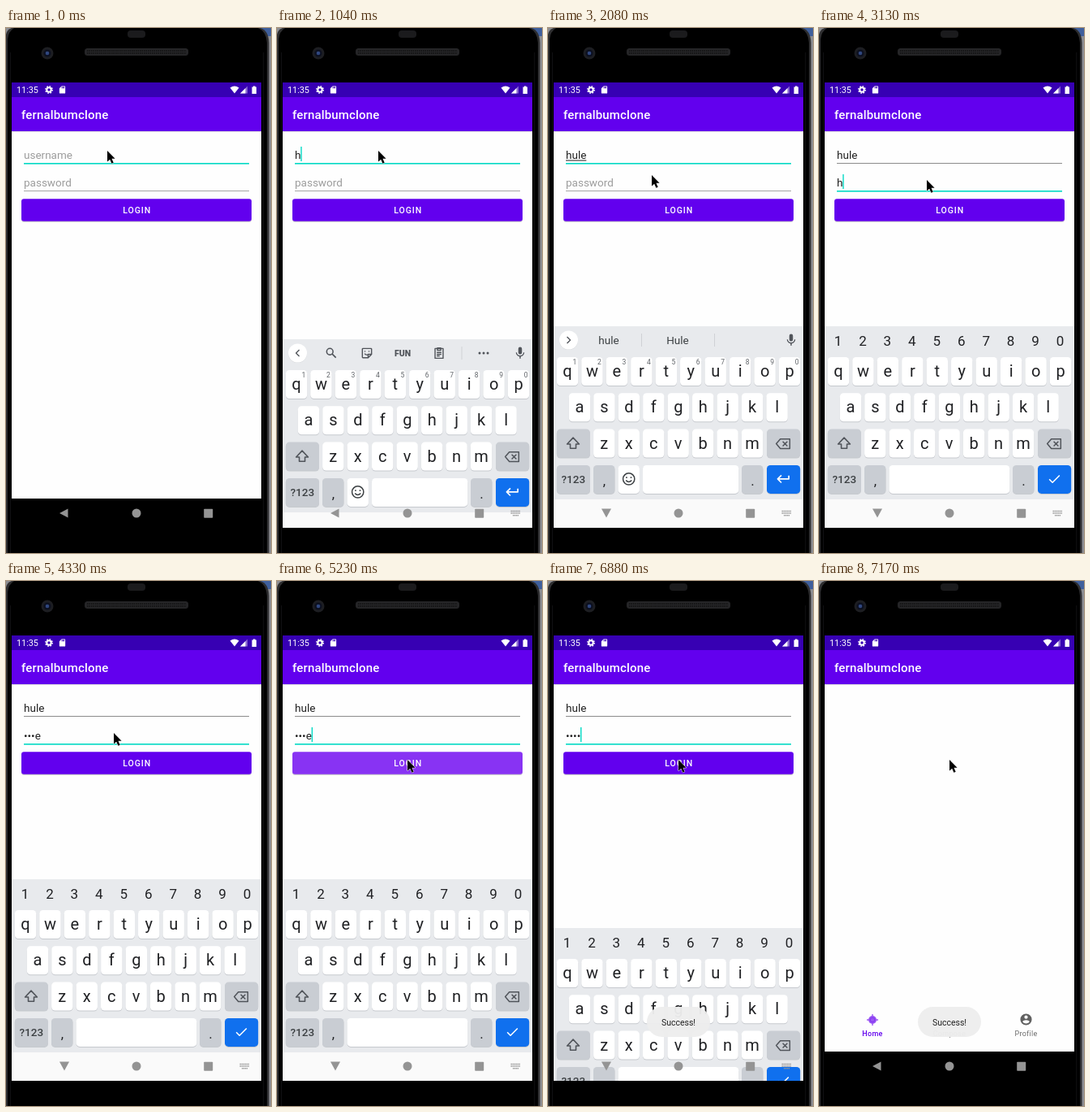
Animation of 327 by 646 pixels, one loop 8 s. Source, as an HTML page:

```html
<!DOCTYPE html>
<html lang="en">
<head>
<meta charset="utf-8">
<title>Login demo</title>
<style>
html, body { margin: 0; width: 100%; height: 100%; overflow: hidden; background: #000; }
svg { display: block; width: 327px; height: 646px; font-family: Roboto, sans-serif; }
text { white-space: pre; }
</style>
</head>
<body>
<script>
(() => {
const LOOP = 8000, USER = 'hule', TITLE = 'fernalbumclone';
const PURPLE = '#6200ee', TEAL = '#03dac5', INK = '#212121', HINT = '#9c9c9c', KEY_INK = '#202124';

function el(parent, tag, attrs = {}, content) {
  const node = document.createElementNS('http://www.w3.org/2000/svg', tag);
  for (const k in attrs) node.setAttribute(k, attrs[k]);
  if (content !== undefined) node.textContent = content;
  parent.appendChild(node);
  return node;
}
const group = (p, a) => el(p, 'g', a);
const box = (p, x, y, width, height, fill, rx = 0) => el(p, 'rect', { x, y, width, height, fill, rx });
const dot = (p, cx, cy, r, fill) => el(p, 'circle', { cx, cy, r, fill });
const path = (p, d, fill) => el(p, 'path', { d, fill });
const label = (p, s, x, y, size, fill, extra = {}) =>
  el(p, 'text', { x, y, 'font-size': size, fill, ...extra }, s);
const mid = (p, s, x, y, size, fill, extra = {}) =>
  label(p, s, x, y, size, fill, { 'text-anchor': 'middle', ...extra });
const at = (node, x, y) => node.setAttribute('transform', `translate(${x} ${y})`);
const show = (node, on) => node.setAttribute('visibility', on ? 'inherit' : 'hidden');

// Icons live on a 24-unit grid centred on (x, y)
function icon(p, d, x, y, size, color, line = 0) {
  const k = size / 24;
  const paint = line
    ? { fill: 'none', stroke: color, 'stroke-width': line, 'stroke-linejoin': 'round' }
    : { fill: color, 'fill-rule': 'evenodd' };
  return el(p, 'path', { d, transform: `translate(${x - size / 2} ${y - size / 2}) scale(${k})`, ...paint });
}

const ICON = {
  sd: 'M18 2h-8L4 8v12c0 1.1.9 2 2 2h12c1.1 0 2-.9 2-2V4c0-1.1-.9-2-2-2zm-6 6h-2V4h2zm3 0h-2V4h2zm3 0h-2V4h2z',
  person: 'M12 2a10 10 0 1 0 0 20a10 10 0 1 0 0-20zm0 3a3 3 0 1 1 0 6a3 3 0 1 1 0-6zm0 14.2c-2.5 0-4.7-1.3-6-3.2 0-2 4-3.1 6-3.1s6 1.1 6 3.1c-1.3 1.9-3.5 3.2-6 3.2z',
  mic: 'M12 14a3 3 0 0 0 3-3V5a3 3 0 0 0-6 0v6a3 3 0 0 0 3 3zm5.3-3c0 3-2.5 5.1-5.3 5.1S6.7 14 6.7 11H5c0 3.4 2.7 6.2 6 6.7V21h2v-3.3c3.3-.5 6-3.3 6-6.7z',
  search: 'M9.5 4a5.5 5.5 0 1 0 0 11a5.5 5.5 0 1 0 0-11M14 14l6 6',
  sticker: 'M5 4h14a1 1 0 0 1 1 1v9l-6 6H5a1 1 0 0 1-1-1V5a1 1 0 0 1 1-1M14 20v-6h6M8.5 8v2M15.5 8v2M8 13q2 3 5 1.5',
  clip: 'M5 4h14v17H5zM9 3h6v4H9zM8 11h8M8 14h8M8 17h5',
  left: 'M15 6l-6 6 6 6',
  right: 'M9 6l6 6-6 6',
  shift: 'M12 4L3.5 13H8v6h8v-6h4.5z',
  erase: 'M8 5h14v14H8l-6-7zM11.5 8.5l7 7M18.5 8.5l-7 7',
  smile: 'M12 3a9 9 0 1 0 0 18a9 9 0 1 0 0-18M8.5 8.5v2.5M15.5 8.5v2.5M7.5 14q4.5 5 9 0',
  enter: 'M20 7v5H4M9 6.5l-5.5 5.5 5.5 5.5',
  check: 'M4 12.5l5 5L20 6.5'
};

const svg = el(document.body, 'svg', { viewBox: '0 0 327 646', width: 327, height: 646 });
const defs = el(svg, 'defs');
el(el(defs, 'clipPath', { id: 'screen' }), 'rect', { x: 7, y: 67, width: 308, height: 548 });
const reveal = el(el(defs, 'clipPath', { id: 'reveal' }), 'rect', { x: 7, y: 85, width: 308, height: 530 });

function drawPhone() {
  box(svg, 0, 0, 327, 646, '#8c8d92');
  box(svg, 300, 0, 27, 10, '#3f5f9c');
  path(svg, 'M0 8Q1 2 7 0H314Q324 3 324.5 18V646H0z', '#2e2e30');
  path(svg, 'M2 14Q3 4 10 0H311Q321 4 322 18V646H2z', '#000');
  box(svg, 5, 30, .7, 616, '#18181a');
  box(svg, 317.5, 30, .7, 616, '#18181a');
  box(svg, 150, 3, 22, 9, '#1b1b1d', 4);
  box(svg, 97, 25, 128, 9, '#252527', 3.5);
  el(svg, 'path', { d: 'M100 28H222M100 31H222', stroke: '#101011', 'stroke-width': 1.5, 'stroke-dasharray': '1.5 1' });
  dot(svg, 51, 31, 7.5, '#1d1e22');
  dot(svg, 51, 31, 4.5, '#0c1020');
  dot(svg, 51, 31, 2.3, '#30477f');
}

function drawStatus() {
  box(svg, 7, 67, 308, 18, '#3700b3');
  label(svg, '11:35', 13, 80, 10.8, '#fff');
  el(svg, 'circle', { cx: 53, cy: 76, r: 2.7, fill: 'none', stroke: '#fff', 'stroke-width': 2 });
  el(svg, 'circle', { cx: 53, cy: 76, r: 4.2, fill: 'none', stroke: '#fff', 'stroke-width': 1.5, 'stroke-dasharray': '1.65 1.65' });
  icon(svg, ICON.sd, 69.5, 76, 11, '#fff');
  path(svg, 'M276.5 73.5Q282 69.5 287.5 73.5L282 80.5z', '#fff');
  path(svg, 'M289 80.5L298 71.5V80.5z', 'rgba(255,255,255,.4)');
  path(svg, 'M289 80.5L295.5 74V80.5z', '#fff');
  path(svg, 'M303.5 72.5H305V71.5H307.5V72.5H309V81H303.5z', '#fff');
}

function appBar(p) {
  box(p, 7, 85, 308, 530, '#fefefe');
  box(p, 7, 127, 308, 1, '#dedede');
  box(p, 7, 85, 308, 42, PURPLE);
  label(p, TITLE, 19, 112, 15, '#fff', { 'font-weight': 500, 'letter-spacing': .15 });
}

function field(p, y, hint) {
  const base = y + 15;
  const f = {
    width: 0,
    hint: label(p, hint, 22, base, 13.5, HINT),
    text: label(p, '', 22, base, 13.5, INK),
    line: box(p, 22, y + 20, 278, 1, '#8c8c8c'),
    caret: box(p, 22, y, 1.4, 18, TEAL)
  };
  f.set = (value, focused, caret, resting) => {
    if (f.text.textContent !== value) f.text.textContent = value;
    f.width = value ? f.text.getComputedTextLength() : 0;
    show(f.hint, !value);
    f.line.setAttribute('fill', focused ? TEAL : resting);
    f.line.setAttribute('height', focused ? 1.6 : 1);
    f.caret.setAttribute('x', 21.8 + f.width);
    show(f.caret, caret);
  };
  return f;
}

function key(p, x, y, w, fill = '#fff') {
  box(p, x, y + 1, w, 35, '#c6c9ce', 4.5);
  return box(p, x, y, w, 35, fill, 4.5);
}

function drawKeyboard(p) {
  const GREY = '#c9cdd3', ICON_INK = '#50545a', pitch = 30.45;
  const kb = { root: group(p) }, r = kb.root;
  const rowY = i => 405 + i * 44.3;
  box(r, 7, 367, 308, 213, '#e8eaed');
  box(r, 7, 580, 308, 36, '#fafafa');
  kb.sup = group(r);
  [['qwertyuiop', 24], ['asdfghjkl', 39], ['zxcvbnm', 69.3]].forEach(([chars, x0], i) => {
    [...chars].forEach((c, j) => {
      const x = x0 + j * pitch, y = rowY(i);
      key(r, x - 13.2, y, 26.4);
      mid(r, c, x, y + 24, 20, KEY_INK);
    });
  });
  r.appendChild(kb.sup);
  kb.nums = group(r);
  for (let i = 0; i < 10; i++) {
    const x = 24 + i * pitch, d = (i + 1) % 10;
    mid(kb.sup, d, x + 9, rowY(0) + 9, 8.5, '#5f6368');
    mid(kb.nums, d, x - .5, 391, 17, KEY_INK);
  }

  key(r, 10.8, rowY(2), 41.2, GREY);
  icon(r, ICON.shift, 31, rowY(2) + 17.5, 21, ICON_INK, 1.8);
  key(r, 270, rowY(2), 41.2, GREY);
  icon(r, ICON.erase, 290, rowY(2) + 18, 20, ICON_INK, 1.8);

  const y = rowY(3);
  key(r, 10.8, y, 41.2, GREY);
  mid(r, '?123', 31.3, y + 22, 13.5, '#3c4043', { 'font-weight': 500 });
  key(r, 56, y, 26.4, GREY);
  mid(r, ',', 69.5, y + 25, 17, KEY_INK);
  key(r, 239, y, 26.4, GREY);
  mid(r, '.', 252.5, y + 25, 17, KEY_INK);
  key(r, 270, y, 41.2, '#1070ee');
  kb.plain = group(r);
  key(kb.plain, 86.5, y, 26.4);
  icon(kb.plain, ICON.smile, 99.7, y + 17, 19, '#3c4043', 1.9);
  key(kb.plain, 117, y, 118.3);
  icon(kb.plain, ICON.enter, 290.5, y + 17, 20, '#fff', 2);
  kb.secret = group(r);
  key(kb.secret, 86.5, y, 148.8);
  icon(kb.secret, ICON.check, 290.5, y + 17, 19, '#fff', 2);

  kb.strip = group(r);
  dot(kb.strip, 25.5, 384.6, 11.5, '#d5d7da');
  dot(kb.strip, 25.5, 384, 11.5, '#fff');
  icon(kb.strip, ICON.mic, 300, 384, 18, ICON_INK);
  kb.tools = group(r);
  icon(kb.tools, ICON.left, 25.5, 384, 16, ICON_INK, 2);
  icon(kb.tools, ICON.search, 67, 384, 17, ICON_INK, 2.2);
  icon(kb.tools, ICON.sticker, 111, 384, 17, ICON_INK, 2);
  mid(kb.tools, 'FUN', 155, 388, 10.5, ICON_INK, { 'font-weight': 900 });
  icon(kb.tools, ICON.clip, 200, 384, 17, ICON_INK, 2);
  box(kb.tools, 227.5, 376, 1, 16, '#cfd1d5');
  for (const x of [250, 255, 260]) dot(kb.tools, x, 384, 1.5, ICON_INK);
  kb.words = group(r);
  icon(kb.words, ICON.right, 25.5, 384, 16, ICON_INK, 2);
  for (const x of [115, 205]) box(kb.words, x, 376, 1, 16, '#cfd1d5');
  kb.low = mid(kb.words, '', 75, 389, 13.5, '#3c4043');
  kb.cap = mid(kb.words, '', 160, 389, 13.5, '#3c4043');
  return kb;
}

function drawHome(p) {
  appBar(p);
  const c = '#9a56f4';
  dot(p, 66, 540, 5, c);
  el(p, 'path', { d: 'M66 533V547M59 540H73', stroke: c, 'stroke-width': 1.4 });
  el(p, 'circle', { cx: 66, cy: 540, r: 2.8, fill: 'none', stroke: '#7b2bf0', 'stroke-width': .8 });
  icon(p, ICON.person, 255.5, 539.5, 17, '#616161');
  const tab = (s, x, fill) => mid(p, s, x, 559.5, 9, fill, { 'letter-spacing': .3 });
  tab('Home', 66, PURPLE).setAttribute('font-weight', 500);
  tab('Compose', 161, '#757575');
  tab('Profile', 255.5, '#6c6c6c');
}

drawPhone();
const view = group(svg, { 'clip-path': 'url(#screen)' });
const login = group(view);
appBar(login);
const user = field(login, 146, 'username');
const pass = field(login, 180, 'password');
const compose = box(login, 22, 162.5, 0, 1, INK);
box(login, 19, 211, 284, 28, '#d2d2d2', 3.5);
const button = box(login, 19, 210.3, 284, 27.5, PURPLE, 3);
mid(login, 'LOGIN', 161.7, 228.2, 10.5, '#fff', { 'font-weight': 500, 'letter-spacing': .94 });
const home = group(group(view, { 'clip-path': 'url(#reveal)' }));
drawHome(home);
drawStatus();

const overlay = group(svg, { 'clip-path': 'url(#screen)' });
box(overlay, 7, 579, 308, 36, '#000');
const kb = drawKeyboard(overlay);
const NAV = '#949494';
const back = path(overlay, 'M76.5 591.5V602.5L66 597z', NAV);
const down = path(overlay, 'M66 591.5H78L72 602.5z', NAV);
dot(overlay, 161, 597, 5.5, NAV);
box(overlay, 244.2, 591.7, 11, 11, NAV, .8);
const ime = el(overlay, 'path', {
  d: 'M288.5 594.5H300M288.5 597H300M291 599.7H298',
  stroke: NAV, 'stroke-width': 1.5, 'stroke-dasharray': '1.4 .6'
});
const toast = group(svg);
box(toast, 122, 524, 78, 37, '#eee', 18.5).setAttribute('opacity', .96);
mid(toast, 'Success!', 161, 547, 10.5, INK);
const pointer = el(svg, 'path', {
  d: 'M0 0V13.5L3.2 10.7L5.4 15.7L7.7 14.7L5.5 9.8H9.6z',
  fill: '#000', stroke: '#fff', 'stroke-width': 1, 'stroke-linejoin': 'round', 'paint-order': 'stroke'
});

function tickAt(t) {
  const lag = t < 440 ? 0 : t < 1480 ? 10 : t < 7170 ? 20 : 30;
  return Math.min(48, Math.floor((t + lag) / 150));
}
const within = (n, a, b) => n >= a && n < b;
const count = (n, marks) => marks.filter(m => n >= m).length;

const TRACK = [[12, 125, 151], [13, 126, 165], [14, 128, 181], [15, 132, 186], [16, 133, 187],
  [29, 133, 187], [31, 139, 195], [33, 156, 214], [34, 161, 220]];
function pointerAt(n) {
  const i = TRACK.findIndex(k => k[0] >= n);
  if (i < 0) return TRACK[TRACK.length - 1].slice(1);
  if (i === 0) return TRACK[0].slice(1);
  const [a, ax, ay] = TRACK[i - 1], [b, bx, by] = TRACK[i], u = (n - a) / (b - a);
  return [ax + (bx - ax) * u, ay + (by - ay) * u];
}

function render(t) {
  const n = tickAt(t);
  const typed = m => USER.slice(0, count(m, [6, 9, 11, 12]));
  const onPass = n >= 16, secret = n >= 17, words = n >= 8 && !secret;

  user.set(typed(n), !onPass, within(n, 2, 14), '#8c8c8c');
  show(compose, within(n, 8, 16));
  compose.setAttribute('width', user.width);

  const len = count(n, [21, 23, 24, 26]);
  const value = len === 0 ? '' : n >= 36 ? '•'.repeat(len) : '•'.repeat(len - 1) + USER[len - 1];
  const caret = within(n, 16, 19) || within(n, 21, 29) || within(n, 32, 36) || n >= 40;
  pass.set(value, onPass, caret, '#a6a6a6');
  button.setAttribute('fill', n === 35 ? '#8833f3' : n === 34 ? '#721af0' : PURPLE);

  show(kb.root, within(n, 6, 48));
  at(kb.root, 0, { 6: 120, 7: 16, 46: 60, 47: 165 }[n] || 0);
  show(kb.tools, n < 8);
  show(kb.words, words);
  show(kb.strip, !secret);
  show(kb.sup, !secret);
  show(kb.plain, !secret);
  show(kb.nums, secret);
  show(kb.secret, secret);
  const guess = typed(n - 1);
  kb.low.textContent = guess;
  kb.cap.textContent = guess.charAt(0).toUpperCase() + guess.slice(1);

  const folded = within(n, 8, 47);
  show(down, folded);
  show(back, !folded);
  show(ime, within(n, 3, 48));

  show(home, n >= 46);
  at(home, 0, { 46: 30, 47: 5 }[n] || 0);
  const edge = { 46: 300, 47: 100 }[n] || 85;
  reveal.setAttribute('y', edge);
  reveal.setAttribute('height', 615 - edge);

  show(toast, n >= 42);
  toast.setAttribute('opacity', { 42: .35, 43: .8 }[n] || 1);
  at(pointer, ...pointerAt(n));
}

const start = performance.now();
function loop() {
  render((performance.now() - start) % LOOP);
  requestAnimationFrame(loop);
}
loop();
})();
</script>
</body>
</html>
```
